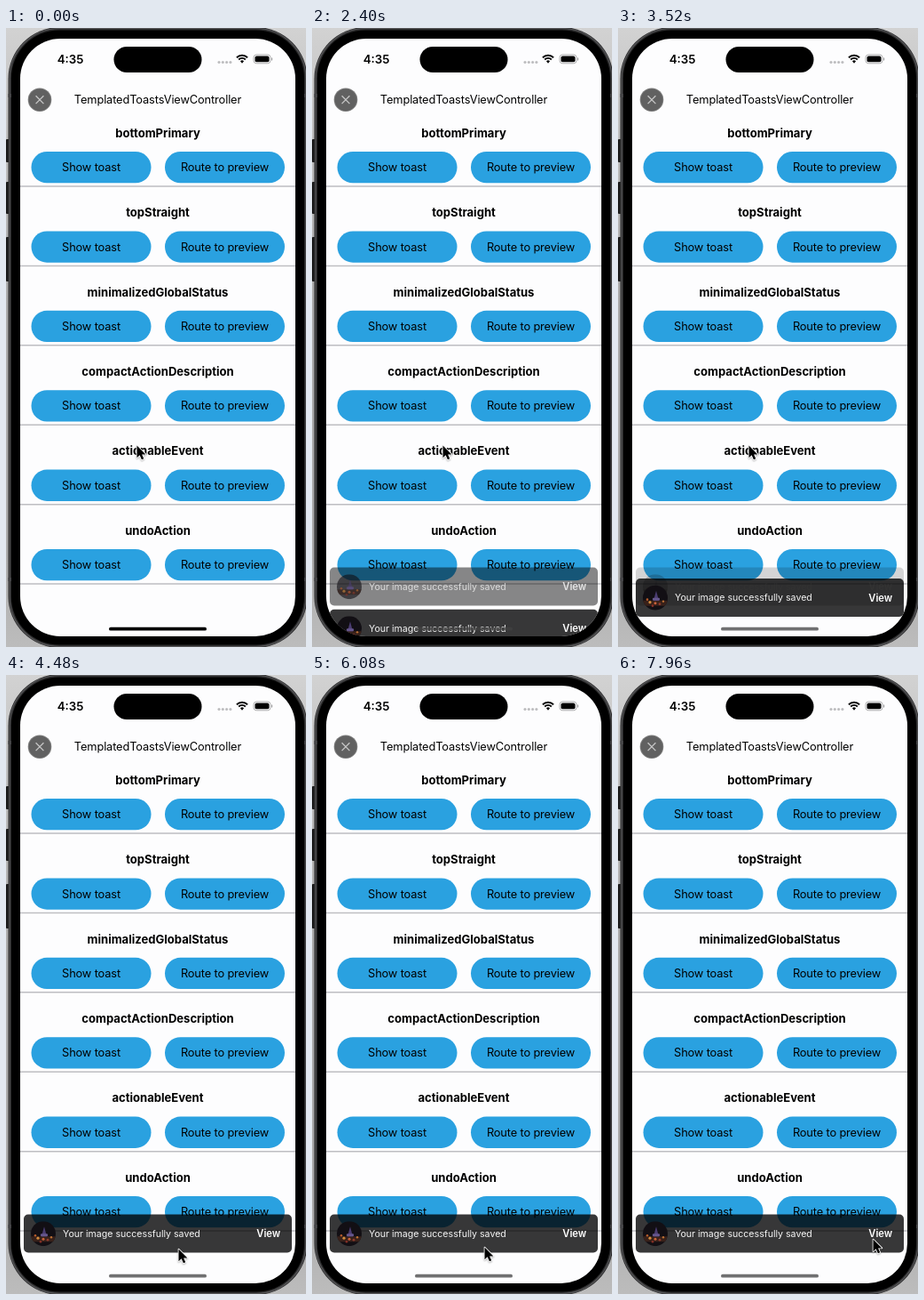
An HTML page with a canvas that plays this animation: 338 by 696 pixels, repeating every 8000 ms.

```html
<!DOCTYPE html>
<html lang="en">
<head>
<meta charset="utf-8">
<title>Toast templates</title>
<style>
  html, body { margin: 0; width: 100%; height: 100%; overflow: hidden; background: #ccc; }
  canvas { display: block; width: 338px; height: 696px; }
</style>
</head>
<body>
<canvas id="stage"></canvas>
<script>
const W = 338, H = 696, LOOP = 8000;
const BLUE = '#2aa1e0';
const ROWS = ['bottomPrimary', 'topStraight', 'minimalizedGlobalStatus',
  'compactActionDescription', 'actionableEvent', 'undoAction'];
const ROW_STEP = 89.4;
const REST_Y = 606.5, TRAVEL = 89, GRAB_Y = 645;

// Toasts pushed from below, and swipes that pull the front one away.
const PUSHES = [200, 2209, 3215], PUSH_TIME = 400;
const SWIPES = [[4500, 4800], [5450, 5700], [6180, 6430], [6780, 7060]];
const POINTER = [
  [0, 147, 469], [3700, 147, 469], [4350, 194, 645],
  [4500, 194, 645], [4800, 194, 690], [5150, 194, 635],
  [5320, 194, 635], [5450, 194, 645], [5700, 194, 668], [5950, 194, 640],
  [6180, 194, 645], [6430, 194, 673], [6650, 194, 645],
  [6780, 194, 645], [7060, 194, 697], [7160, 194, 690],
  [7840, 287, 634], [8000, 287, 634]
];

const canvas = document.getElementById('stage');
const ctx = canvas.getContext('2d');
const dpr = window.devicePixelRatio || 1;
canvas.width = W * dpr;
canvas.height = H * dpr;

const clamp = v => Math.max(0, Math.min(1, v));
const lerp = (a, b, p) => a + (b - a) * p;
const smooth = v => { v = clamp(v); return v * v * (3 - 2 * v); };

function roundRect(x, y, w, h, r) {
  ctx.beginPath();
  ctx.roundRect(x, y, w, h, r);
}

function box(x, y, w, h, r, color) {
  roundRect(x, y, w, h, r);
  ctx.fillStyle = color;
  ctx.fill();
}

function disc(x, y, r, color) {
  ctx.beginPath();
  ctx.arc(x, y, r, 0, Math.PI * 2);
  ctx.fillStyle = color;
  ctx.fill();
}

function line(points, color, width) {
  ctx.beginPath();
  points.forEach(([x, y], i) => i ? ctx.lineTo(x, y) : ctx.moveTo(x, y));
  ctx.strokeStyle = color;
  ctx.lineWidth = width;
  ctx.stroke();
}

function text(str, x, y, size, weight, color, align = 'center', spacing = 0) {
  ctx.font = `${weight} ${size}px Inter, "Open Sans", sans-serif`;
  ctx.letterSpacing = spacing + 'px';
  ctx.textAlign = align;
  ctx.fillStyle = color;
  ctx.fillText(str, x, y);
}

function drawPhone() {
  const bg = ctx.createLinearGradient(0, 0, 0, H);
  bg.addColorStop(0, '#d2d2d2');
  bg.addColorStop(0.15, '#c2c2c2');
  bg.addColorStop(0.45, '#acacac');
  bg.addColorStop(0.85, '#acacac');
  bg.addColorStop(1, '#bcbcbc');
  ctx.fillStyle = bg;
  ctx.fillRect(0, 0, W, H);

  for (const [y, h] of [[125, 26], [173, 36], [235, 50]]) box(0, y, 5, h, 1, '#1b1b1b');
  box(2.5, -1, 337, 698, 58, '#2c2c2d');
  roundRect(4, 0.5, 334, 695, 56.5);
  ctx.strokeStyle = '#555557';
  ctx.lineWidth = 1.2;
  ctx.stroke();
  for (const y of [74, 618]) {
    box(2.5, y, 4, 4, 0, '#454547');
    box(335.5, y, 3, 4, 0, '#454547');
  }
  box(6, 2.5, 330, 691, 54, '#000');
  box(16, 12, 310, 672, 45, '#fdfdfe');
}

function drawStatus() {
  text('4:35', 72.5, 40, 13.3, 600, '#000');
  box(121.5, 21, 99, 29, 14.5, '#000');
  for (let i = 0; i < 4; i++) disc(240 + i * 4.3, 38.5, 1.55, '#bdbdbf');

  // wifi fan
  ctx.strokeStyle = '#000';
  ctx.lineWidth = 1.9;
  for (const r of [8.6, 5.4]) {
    ctx.beginPath();
    ctx.arc(266, 39.3, r, -Math.PI * 0.75, -Math.PI * 0.25);
    ctx.stroke();
  }
  ctx.beginPath();
  ctx.moveTo(266, 39.8);
  ctx.arc(266, 39.3, 2.9, -Math.PI * 0.75, -Math.PI * 0.25);
  ctx.fillStyle = '#000';
  ctx.fill();

  roundRect(279, 30, 19, 9.8, 3.2);
  ctx.strokeStyle = '#a6a6a8';
  ctx.lineWidth = 0.9;
  ctx.stroke();
  box(280.5, 31.5, 16, 6.8, 1.9, '#000');
  box(299, 33.3, 1.2, 3.2, 0.6, '#a6a6a8');
}

function drawPage() {
  disc(38, 80.7, 13.3, '#7d7d7d');
  disc(38, 80.7, 12.3, '#616161');
  line([[33.6, 76.3], [42.4, 85.1]], '#c6c6c6', 1.3);
  line([[42.4, 76.3], [33.6, 85.1]], '#c6c6c6', 1.3);
  text('TemplatedToastsViewController', 171, 85.4, 12.8, 400, '#000', 'center', -0.12);

  ROWS.forEach((name, i) => {
    const y = i * ROW_STEP;
    text(name, 171, 122.8 + y, 13.05, 700, '#000');
    for (const [x, label] of [[28.5, 'Show toast'], [179, 'Route to preview']]) {
      box(x, 139 + y, 135, 35.3, 17.6, BLUE);
      text(label, x + 67.5, 161.2 + y, 12.8, 400, '#000', 'center', -0.14);
    }
    box(16, 177.3 + y, 310, 1.5, 0, '#bebec2');
  });
}

// Night skyline in a small round thumbnail.
function drawThumb(x, y) {
  ctx.save();
  ctx.beginPath();
  ctx.arc(x, y, 14, 0, Math.PI * 2);
  ctx.clip();
  box(x - 14, y - 14, 28, 28, 0, '#120f14');
  box(x - 14, y + 3, 28, 6, 0, '#38211a');
  ctx.beginPath();
  ctx.moveTo(x + 1, y - 8);
  ctx.lineTo(x + 4, y + 3);
  ctx.lineTo(x - 2, y + 3);
  ctx.fillStyle = '#4a3c70';
  ctx.fill();
  box(x - 3, y, 8, 3, 1, '#65568c');
  for (const [dx, dy, r, c] of [[-9, 2, 1.3, '#b45a2a'], [-6, 5, 1.6, '#d18a3c'],
    [0, 6, 1.5, '#c9603a'], [5, 7, 1.4, '#8d3a2c'], [9, 4, 1.2, '#bd7134'],
    [-3, 9, 1.3, '#873027']]) disc(x + dx, y + dy, r, c);
  ctx.restore();
}

function drawToast(y, alpha) {
  if (alpha <= 0 || y >= 684) return;
  ctx.globalAlpha = alpha;
  box(20, y, 302, 43, 5, 'rgba(0,0,0,0.78)');
  drawThumb(42, y + 21.7);
  ctx.globalAlpha = Math.sqrt(alpha);
  text('Your image successfully saved', 64, y + 25.5, 10.6, 400, '#f4f4f4', 'left');
  text('View', 309.2, y + 25.7, 11.2, 600, '#fff', 'right');
  ctx.globalAlpha = 1;
}

function pointerAt(t) {
  let i = 1;
  while (i < POINTER.length - 1 && t >= POINTER[i][0]) i++;
  const [t0, x0, y0] = POINTER[i - 1], [t1, x1, y1] = POINTER[i];
  const p = smooth((t - t0) / (t1 - t0));
  return { x: lerp(x0, x1, p), y: lerp(y0, y1, p) };
}

function drawToasts(t) {
  if (t < PUSHES[0]) return;
  const swipe = SWIPES.findLast(s => t >= s[0]);
  if (swipe) {
    const held = pointerAt(Math.min(t, swipe[1])).y - GRAB_Y;
    const drop = lerp(held, TRAVEL, smooth((t - swipe[1]) / 220));
    drawToast(REST_Y, clamp(drop / 28));
    drawToast(REST_Y + drop, 1);
    return;
  }
  const start = PUSHES.findLast(s => t >= s);
  const left = 1 - smooth((t - start) / PUSH_TIME);
  if (start !== PUSHES[0]) drawToast(REST_Y, left ** 0.8);
  drawToast(REST_Y + TRAVEL * left, 1);
}

function drawPointer(t) {
  const { x, y } = pointerAt(t);
  if (SWIPES.some(([a, b]) => t >= a && t < b)) {
    ctx.beginPath();
    ctx.arc(x, y + 0.5, 20.5, 0, Math.PI * 2);
    ctx.strokeStyle = '#000';
    ctx.lineWidth = 4.5;
    ctx.stroke();
    ctx.strokeStyle = '#fff';
    ctx.lineWidth = 1.8;
    ctx.stroke();
  }
  ctx.save();
  ctx.translate(x + 0.5, y + 0.5);
  ctx.scale(0.9, 0.9);
  ctx.beginPath();
  for (const [px, py] of [[0, 0], [0, 15.2], [3.5, 12], [6, 17.6], [8.6, 16.5], [6.2, 11], [11, 11]])
    ctx.lineTo(px, py);
  ctx.closePath();
  ctx.lineJoin = 'round';
  ctx.shadowColor = 'rgba(0,0,0,0.3)';
  ctx.shadowBlur = 2 * dpr;
  ctx.shadowOffsetY = dpr;
  ctx.strokeStyle = '#fff';
  ctx.lineWidth = 1.8;
  ctx.stroke();
  ctx.shadowColor = 'transparent';
  ctx.fillStyle = '#000';
  ctx.fill();
  ctx.restore();
}

function drawHomeBar(t) {
  const p = smooth((t - PUSHES[0]) / PUSH_TIME);
  const shade = Math.round(66 * p);
  box(116, 673.8, 110, 3.8, 1.9, `rgba(${shade},${shade},${shade},${1 - 0.25 * p})`);
}

function draw(t) {
  ctx.setTransform(dpr, 0, 0, dpr, 0, 0);
  drawPhone();
  drawStatus();
  drawPage();

  ctx.save();
  roundRect(16, 12, 310, 672, 45);
  ctx.clip();
  drawToasts(t);
  drawHomeBar(t);
  ctx.restore();

  drawPointer(t);
}

const begin = performance.now();
function tick() {
  draw((performance.now() - begin) % LOOP);
  requestAnimationFrame(tick);
}
tick();
</script>
</body>
</html>
```
